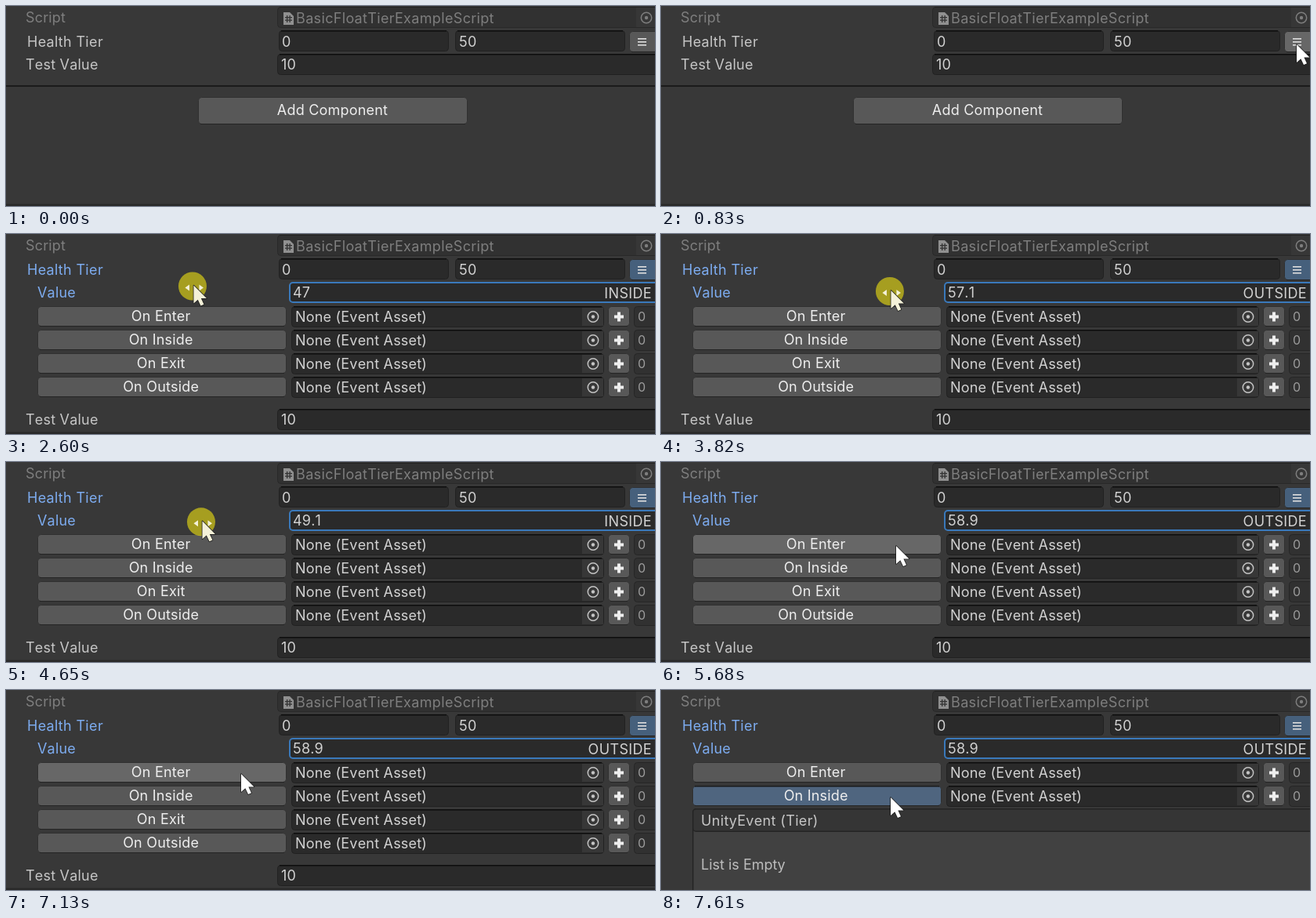
These frames come from a looping animation (828x255 px, 8 s). An HTML page with a canvas:

```html
<!DOCTYPE html>
<html lang="en">
<head>
<meta charset="utf-8">
<title>Tier inspector</title>
<style>
html, body { margin: 0; width: 100%; height: 100%; overflow: hidden; background: #383838; }
canvas { display: block; }
</style>
</head>
<body>
<canvas id="stage" width="828" height="255"></canvas>
<script>
const W = 828, H = 255, LOOP = 8000;
const g = document.getElementById('stage').getContext('2d');

// Pointer path: time, x, y
const path = [
  [70, 36, 90], [330, 330, 84], [600, 690, 74], [830, 811, 49],
  [1430, 811, 48], [1570, 690, 88], [1770, 500, 99], [1960, 320, 80], [2120, 254, 69],
  [2330, 254, 68], [2600, 238, 66.5], [2740, 235, 66], [2930, 235, 66],
  [3480, 300, 73], [3680, 300, 73], [3820, 292, 73], [4310, 239, 76], [4510, 239, 76],
  [5070, 302, 78], [5270, 302, 78], [5330, 301.6, 80], [5680, 300, 107],
  [7190, 300, 107], [7400, 293, 137], [8000, 293, 137]
];
const DRAG_START = 2330, DRAG_END = 5270, SETTLE = 5330, EXPAND = 1095;
const presses = [[895, EXPAND], [DRAG_START, DRAG_END], [6135, 6205], [6995, 7065], [7465, 7605]];
const LIGHT = '#d2d2d2', LABEL = '#c6c6c6', BLUE = '#7dacf0', DIM = '#7e7e7e';
const TIGHT = 0, NORMAL = 0.2, WIDE = 0.35;
const between = (v, a, b) => v >= a && v < b;

// Monotone cubic interpolation, so holds stay still
function along(t, k) {
  let i = 0;
  while (i < path.length - 2 && t >= path[i + 1][0]) i++;
  const slope = j => j < 0 || j > path.length - 2 ? 0 :
    (path[j + 1][k] - path[j][k]) / (path[j + 1][0] - path[j][0]);
  const tangent = j => {
    const a = slope(j - 1), b = slope(j);
    return a * b <= 0 ? 0 : 2 * a * b / (a + b);
  };
  const p = path[i], q = path[i + 1], d = q[0] - p[0];
  const u = Math.max(0, Math.min(1, (t - p[0]) / d)), u2 = u * u, u3 = u2 * u;
  return p[k] * (2 * u3 - 3 * u2 + 1) + q[k] * (3 * u2 - 2 * u3) +
    d * (tangent(i) * (u3 - 2 * u2 + u) + tangent(i + 1) * (u3 - u2));
}

function valueAt(t) {
  if (t < DRAG_START) return 50;
  const x = along(Math.min(t, SETTLE), 1);
  return +(50 + 0.187 * (x - 254)).toFixed(1);
}

function text(s, x, y, color = LABEL, { align = 'left', size = 18, tracking = NORMAL } = {}) {
  g.font = size + 'px Inter, sans-serif';
  g.fontKerning = 'none';
  g.letterSpacing = tracking + 'px';
  g.textAlign = align;
  g.fillStyle = color;
  g.fillText(s, x, y);
}

function rect(x, y, w, h, color) {
  g.fillStyle = color;
  g.fillRect(x, y, w, h);
}

function box(x, y, w, h, fill, edge, r = 4, line = 1) {
  g.beginPath();
  g.roundRect(x + line / 2, y + line / 2, w - line, h - line, r);
  g.fillStyle = fill;
  g.fill();
  g.strokeStyle = edge;
  g.lineWidth = line;
  g.stroke();
}

function field(x, y, w, h, edge) {
  box(x, y, w, h, '#2a2a2a', edge || '#212121', 4, edge ? 2 : 1);
  if (!edge) rect(x + 3, y, w - 6, 1.5, '#0d0d0d');
}

function button(x, y, w, h, fill = '#585858') {
  box(x, y, w, h, fill, '#303030', 4);
  rect(x + 3, y + h - 1, w - 6, 1, '#242424');
}

function picker(x, y, color) {
  g.strokeStyle = g.fillStyle = color;
  g.lineWidth = 1.5;
  g.beginPath();
  g.arc(x, y, 6.7, 0, 7);
  g.stroke();
  g.beginPath();
  g.arc(x, y, 2.2, 0, 7);
  g.fill();
}

function scriptRow() {
  text('Script', 25, 21, DIM);
  box(346, 1, 500, 27, '#313131', '#292929');
  rect(349, 1, 500, 1, '#222');
  rect(804, 2, 30, 25, '#373737');
  poly([[354, 8], [362, 8], [367, 13], [367, 24], [354, 24]], '#909090');
  for (const d of [0, 3.5]) {
    rect(358 + d, 12, 1.3, 9, '#333');
    rect(356, 14 + d, 9, 1.3, '#333');
  }
  text('BasicFloatTierExampleScript', 370, 22, DIM, { tracking: WIDE });
  picker(817, 15, DIM);
}

function tierRow(s) {
  text('Health Tier', 27, 52, s.open ? BLUE : LABEL, { tracking: WIDE });
  const hot = s.kind === 'beam' && between(s.y, 32, 58);
  field(348, 31, 217, 27, hot && between(s.x, 348, 565) && '#656565');
  field(573, 31, 217, 27, hot && between(s.x, 573, 790) && '#656565');
  text('0', 352, 52, LIGHT);
  text('50', 578, 52, LIGHT);
  const over = s.x > 795 && between(s.y, 32, 58);
  button(795, 32, 40, 27, s.open || s.down && over ? '#46607c' : over ? '#676767' : '#585858');
  for (const y of [41, 45, 49]) rect(806, y, 11, 1.6, '#dedede');
}

function valueRow(s) {
  text('Value', 40, 81, s.t >= DRAG_START ? BLUE : LABEL);
  const hot = s.kind === 'beam' && between(s.y, 61, 89);
  field(361, 61, 490, 27, s.t >= DRAG_START ? '#3a79bb' : hot && '#656565');
  text(String(s.value), 366, 81, LIGHT);
  text(s.value > 50 ? 'OUTSIDE' : 'INSIDE', 824, 82, LIGHT, { align: 'right', tracking: WIDE });
}

function eventRow(name, y, selected, s) {
  const over = !s.dragging && between(s.x, 40, 357) && between(s.y, y + 1, y + 26);
  const fill = selected ? (over ? '#4f657f' : '#46607c') :
    over ? (s.down ? '#46607c' : '#676767') : '#585858';
  button(40, y, 318, 26, fill);
  if (selected) rect(43, y, 312, 1.5, '#1b1b1b');
  text(name, 197.7, y + 19, '#eee', { align: 'center' });
  field(364, y, 399, 27);
  rect(735, y + 2, 27, 23, '#373737');
  text('None (Event Asset)', 369, y + 20, LIGHT);
  picker(749, y + 13.5, '#c4c4c4');
  button(768, y, 28, 26);
  rect(776, y + 11.5, 12, 4, '#eee');
  rect(780, y + 7.5, 4, 12, '#eee');
  box(801, y, 50, 27, '#313131', '#262626');
  text('0', 806, y + 19, '#9c9c9c', { size: 16 });
}

function eventPanel(y) {
  box(40, y, 820, 113, '#414141', '#242424', 4, 1.5);
  box(40, y, 820, 30, '#353535', '#242424', 4, 1.5);
  text('UnityEvent (Tier)', 51, y + 22, LABEL, { tracking: WIDE });
  text('List is Empty', 51, y + 78, '#bdbdbd', { tracking: TIGHT });
}

function testRow(y, s) {
  text('Test Value', 25, y + 20);
  const hot = s.kind === 'beam' && between(s.y, y, y + 28);
  field(346, y, 500, 27, hot && '#656565');
  text('10', 351, y + 20, LIGHT);
  rect(0, y + 40, W, 2, '#1a1a1a');
  button(245, y + 55, 344, 35);
  text('Add Component', 416.5, y + 78, '#eee', { align: 'center' });
}

function poly(points, fill) {
  g.beginPath();
  points.forEach(([x, y]) => g.lineTo(x, y));
  g.closePath();
  g.fillStyle = fill;
  g.fill();
}

function beam() {
  const stroke = (color, width) => {
    g.strokeStyle = color;
    g.lineWidth = width;
    g.beginPath();
    g.moveTo(-6, -11.5);
    g.lineTo(6, -11.5);
    g.moveTo(0, -11.5);
    g.lineTo(0, 11.5);
    g.moveTo(-6, 11.5);
    g.lineTo(6, 11.5);
    g.stroke();
  };
  g.lineCap = 'square';
  stroke('#181818', 4);
  stroke('#f4f4f4', 2);
}

function arrow(fill) {
  poly([[0, 0], [0, 23], [5.3, 18.2], [9, 26], [13, 24.3], [9.4, 16.6], [16.5, 16.6]], fill);
  g.strokeStyle = '#1a1a1a';
  g.lineWidth = 1.5;
  g.lineJoin = 'round';
  g.stroke();
  g.fill();
}

function pointer(s) {
  g.save();
  g.translate(s.x, s.y);
  if (s.down) {
    g.fillStyle = 'rgba(226,214,20,.65)';
    g.beginPath();
    g.arc(0, 0, 18, 0, 7);
    g.fill();
  }
  if (s.kind === 'beam') beam();
  else if (s.kind === 'slide') {
    const cream = '#f4f1d8';
    poly([[-9.5, 2], [-4, -2], [-4, 6]], cream);
    poly([[14, 2], [8.5, -2], [8.5, 6]], cream);
    g.translate(1.5, -1);
    arrow(cream);
  } else arrow('#fff');
  g.restore();
}

function pointerKind(s) {
  if (s.dragging) return 'slide';
  if (between(s.y, 61, 89)) {
    if (s.x > (s.open ? 361 : 346)) return 'beam';
    if (between(s.x, 25, 345)) return 'slide';
  }
  const inTier = between(s.x, 348, 565) || between(s.x, 573, 790);
  return inTier && between(s.y, 32, 58) ? 'beam' : 'arrow';
}

function draw(t) {
  const shown = t >= 70;
  const s = {
    t, value: valueAt(t), open: t >= EXPAND,
    x: shown ? along(t, 1) : -100, y: shown ? along(t, 2) : 90,
    down: presses.some(([a, b]) => between(t, a, b)),
    dragging: between(t, DRAG_START, DRAG_END)
  };
  s.kind = pointerKind(s);
  const unfolded = between(t, 6205, 7065) ? 0 : t >= 7605 ? 1 : -1;

  rect(0, 0, W, H, '#383838');
  scriptRow();
  tierRow(s);
  let y = 61;
  if (s.open) {
    valueRow(s);
    y = 92;
    ['On Enter', 'On Inside', 'On Exit', 'On Outside'].forEach((name, i) => {
      eventRow(name, y, i === unfolded, s);
      y += 30;
      if (i === unfolded) {
        eventPanel(y - 1);
        y += 143;
      }
    });
    y += 11;
  }
  testRow(y, s);
  if (unfolded < 0) rect(0, 252.5, W, 2.5, '#292929');
  pointer(s);
}

function tick() {
  draw(performance.now() % LOOP);
  requestAnimationFrame(tick);
}
tick();
</script>
</body>
</html>
```
